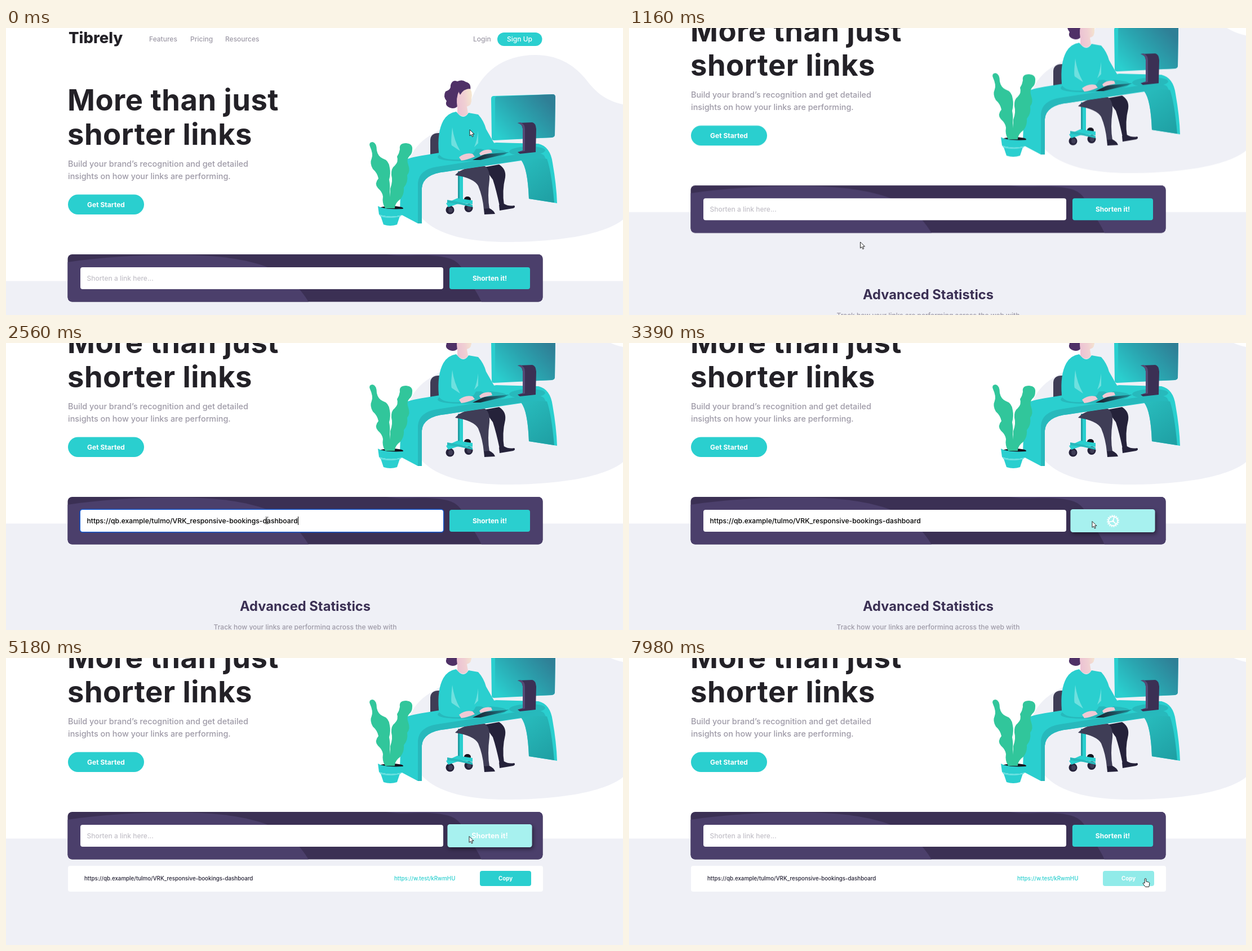
Recreate the animation shown at these times as an HTML page with a canvas. Size 1095x511 px, loop 8 s.

```html
<!DOCTYPE html>
<html lang="en">
<head>
<meta charset="utf-8">
<title>Link shortener</title>
<style>
  html, body { margin: 0; width: 100%; height: 100%; overflow: hidden; background: #fff; }
  body { position: relative; font: 500 12px Inter, "Open Sans", sans-serif; font-optical-sizing: none; color: #9e9aa7; }
  #page, #art { position: absolute; left: 0; top: 0; width: 1095px; height: 640px; }
  /* zero line height centres the capitals on the given y */
  p { position: absolute; margin: 0; line-height: 0; white-space: pre; }
  .mid { transform: translateX(-50%); }
  .logo { font-size: 27.5px; font-weight: 800; color: #232127; }
  .title { font-size: 52.5px; font-weight: 700; letter-spacing: .5px; color: #232127; }
  .lead { font-size: 14.4px; }
  .white { color: #fff; }
  .bold { font-weight: 700; color: #fff; }
  .section { font-size: 23.7px; font-weight: 700; color: #3b3054; }
  .box { position: absolute; border-radius: 4px; background: #fff; }
  #field { left: 132px; top: 426px; width: 644px; height: 39px; }
  #send { left: 787px; top: 426px; width: 143px; height: 39px; }
  #row { left: 109.5px; top: 499px; width: 843px; height: 45.5px; }
  #copy { left: 731.5px; top: 9px; width: 91px; height: 27px; }
  #hint { left: 11.5px; top: 19.5px; color: #c3c0c8; }
  #value { left: 11.5px; top: 19.5px; color: #000; font-size: 12.2px; }
  #caret { position: absolute; top: -7.5px; width: 1px; height: 15px; background: #000; }
  .small { font-size: 9.75px; }
  #gear { position: absolute; left: 59.5px; top: 7.5px; }
  #cursor { position: absolute; left: 0; top: 0; overflow: visible; }
</style>
</head>
<body>
<div id="page">
  <canvas id="art"></canvas>
  <div id="text"></div>
  <div id="more">
    <p class="section mid" style="left:531px;top:597.5px">Advanced Statistics</p>
    <p class="mid" style="left:531px;top:635px">Track how your links are performing across the web with</p>
  </div>
  <div id="field" class="box">
    <p id="hint">Shorten a link here...</p>
    <p id="value"><span id="typed"></span><i id="caret"></i></p>
  </div>
  <div id="send" class="box">
    <p id="sendText" class="bold mid" style="left:71.5px;top:19.5px">Shorten it!</p>
    <svg id="gear" width="24" height="24" viewBox="-12 -12 24 24" fill="none" stroke="#fff">
      <circle r="7.7" stroke-width="1.7"/>
      <circle r="9.4" stroke-width="2" pathLength="32" stroke-dasharray="1 1"/>
      <path id="spokes" stroke-width="1.7"/>
      <circle r="1.6" fill="#fff" stroke="none"/>
    </svg>
  </div>
  <div id="row" class="box">
    <p id="longUrl" class="small" style="left:29.5px;top:22.5px;color:#232033"></p>
    <p class="small" style="left:579.5px;top:22.5px;color:#2acfcf">https://w.test/kRwmHU</p>
    <div id="copy" class="box"><p class="bold small mid" style="left:45.5px;top:13.5px">Copy</p></div>
  </div>
</div>
<svg id="cursor" width="20" height="20"><path id="shape" stroke-linejoin="round"/></svg>

<script>
const LOOP = 8000;
const URL_TEXT = "https://qb.example/tulmo/VRK_responsive-bookings-dashboard";
const CYAN = [42, 207, 207], LIGHT = [167, 241, 239], GRAY = [158, 154, 167];
const $ = id => document.getElementById(id);

// ---- static text: x, centre y, words, classes
const labels = [
  [111, 17, "Tibrely", "logo"],
  [254, 20, "Features"], [327, 20, "Pricing"], [389, 20, "Resources"], [829, 20, "Login"],
  [911.5, 20, "Sign Up", "white mid"],
  [109, 127.5, "More than just", "title"],
  [109, 188.5, "shorter links", "title"],
  [110, 242, "Build your brand’s recognition and get detailed", "lead"],
  [110, 263.5, "insights on how your links are performing.", "lead"],
  [177.5, 314.5, "Get Started", "bold mid"]
];
for (const [x, y, words, cls = ""] of labels) {
  const p = document.createElement("p");
  p.className = cls;
  p.textContent = words;
  p.style.left = x + "px";
  p.style.top = y + "px";
  $("text").append(p);
}
$("longUrl").textContent = URL_TEXT;
$("spokes").setAttribute("d", [75, 195, 315].map(a => {
  const r = a * Math.PI / 180;
  return `M0 0L${7.5 * Math.cos(r)} ${7.5 * Math.sin(r)}`;
}).join(""));

// ---- static artwork
function drawArt() {
  const canvas = $("art"), dpr = window.devicePixelRatio || 1;
  canvas.width = 1095 * dpr;
  canvas.height = 640 * dpr;
  const c = canvas.getContext("2d");
  c.scale(dpr, dpr);

  const fill = (d, color) => { c.fillStyle = color; c.fill(new Path2D(d)); };
  const rect = (x, y, w, h, r, color) => {
    c.fillStyle = color; c.beginPath(); c.roundRect(x, y, w, h, r); c.fill();
  };
  const oval = (x, y, rx, ry, color, turn = 0) => {
    c.fillStyle = color; c.beginPath(); c.ellipse(x, y, rx, ry, turn, 0, 7); c.fill();
  };
  const fade = (x0, y0, x1, y1, ...colors) => {
    const g = c.createLinearGradient(x0, y0, x1, y1);
    colors.forEach((color, i) => g.addColorStop(i / (colors.length - 1), color));
    return g;
  };
  const cyan = "#2acfcf", shade = "#27b9bc", dark = "#3f3d56", night = "#25223a";
  const violet = "#3b3054", plum = "#4b3f6b", green = "#31c69b", skin = "#f0c9d4";

  rect(0, 0, 1095, 450.5, 0, "#fff");
  rect(0, 450.5, 1095, 190, 0, "#eff0f6");
  rect(872, 8, 79.5, 24, 12, cyan);
  rect(110, 296.5, 135, 35.5, 17.7, cyan);

  // backdrop
  fill("M1095 136C1060 128 1045 112 1028 90C1005 62 975 48 940 48C880 48 845 80 828 122C810 170 760 180 735 205C705 235 695 290 735 335C765 372 830 381 890 381C970 381 1060 370 1095 341Z", "#eff0f6");

  // chair
  fill("M753 227V199Q754 187 768 187L774 187V230Z", dark);
  oval(819, 305, 6, 5, "#16141f");
  rect(802, 255, 9, 50, 0, cyan);
  rect(802, 255, 3, 50, 0, "#1f9fa3");
  for (const [x, y] of [[788, 324], [821, 320.5]]) {
    oval(x, y, 7.5, 7.5, night);
    oval(x + 1, y, 4, 4.5, dark);
  }
  fill("M781 312L801 303L828 307V314L808 311L785 319Z", cyan);
  fill("M783 306L800 309L828 315V319L806 314L783 311Z", shade);

  // legs
  fill("M848 248L875 243Q888 251 886 266Q880 290 884 315L876 317Q870 288 864 270Z", night);
  fill("M875 315L884 313Q892 318 902 316Q905 319 900 321L876 325Z", night);
  fill("M797 262Q810 246 850 246Q859 252 858 270Q854 300 858 322L848 323Q846 300 838 281Q830 267 797 262Z", dark);
  fill("M848 322L858 321Q866 325 868 331L849 332Z", night);

  // monitor
  fill("M866 121L970 118Q975 118 975 123L974 190Q974 194 969 195L866 200Q862 200 862 196L861 126Q861 121 866 121Z", cyan);
  fill("M871 122L970 118Q975 118 975 123L974 190Q974 194 969 195L868 199V126Q868 122 871 122Z",
    fade(875, 195, 955, 122, cyan, "#2aa5b0", "#2f7f96"));

  // desk
  fill("M699 331Q700 250 713 233Q718 230 770 222L870 204L945 206Q966 211 970 240Q977 280 978 312L972 311L928 304Q926 250 915 236L780 256Q740 260 738 285V348H731Z", cyan);
  fill("M731 348V276Q733 252 765 247L900 226Q945 217 955 227L958 233L915 235L780 256Q740 260 738 285V348Z", shade);
  fill("M914 235Q935 231 960 233Q968 255 973 311L928 304Q926 250 914 235Z", fade(915, 235, 970, 310, "#28bcbd", "#1f9fa3"));
  oval(827, 226, 61, 10.5, shade, -.06);
  oval(925, 219, 32, 8, shade, -.04);

  // monitor stand
  fill("M908 169L934 168Q940 169 941 180L940 221L912 224L908 221L918 218L917 179Q916 171 908 169Z", violet);
  fill("M908 169L913 168Q921 171 921 180V219L908 221L917 218V179Q916 171 908 169Z", "#554a75");

  // laptop, person
  fill("M828 235L849 225L893 221L884 225L842 235Z", fade(828, 235, 890, 221, "#1b1d2b", "#1d4a58", "#1f8a94"));
  fill("M788 142Q778 138 782 130Q775 122 780 113Q790 110 789 102Q792 91 801 95Q810 91 816 96Q826 98 824 110L812 113Q806 118 805 134Q799 146 788 142Z", "#4f3167");
  fill("M801 142Q798 124 804 112Q810 105 821 106Q829 112 826 126Q827 138 818 140L820 152Q813 162 801 152Z",
    fade(800, 130, 827, 126, "#ecc3d3", "#f0cfd3", "#f5e6cf"));
  fill("M803 113Q806 103 824 104L824 108Q812 108 806 119Z", "#4f3167");
  fill("M768 222Q765 185 776 165Q784 151 799 149Q812 166 821 151L838 154Q848 165 852 180L868 208Q866 215 850 218L836 212L830 222Q818 227 806 234Q770 236 768 222Z", cyan);
  fill("M792 177Q789 205 791 209L806 219Q795 200 792 177Z", "#6fe0df");
  fill("M838 183Q836 200 831 212L838 205Z", "#6fe0df");
  fill("M804 230Q815 221 828 224L832 229Q818 235 808 236Z", skin);
  fill("M840 223Q848 215 861 217L863 222Q852 224 842 227Z", skin);

  // plant
  oval(684, 321, 21, 4, "#16141f");
  fill("M646 211Q643 203 651 203Q658 205 658 218Q660 228 668 232Q680 236 681 249Q683 259 680 270Q682 280 681 292L684 321H673Q667 312 669 300Q668 292 660 285Q653 277 661 268Q659 258 651 251Q645 241 649 232Q652 224 646 211Z", green);
  fill("M699 216Q697 205 710 205Q722 206 721 216Q721 224 716 228Q710 234 714 244Q718 255 712 262Q714 275 706 284Q707 300 696 308Q690 314 690 321H680Q682 300 682 286Q687 272 684 262Q683 250 690 245Q697 238 694 229Q698 223 699 216Z", green);
  fill("M660 317Q672 324 706 322L703 333Q682 339 662 332Z", cyan);
  fill("M665 335Q682 340 699 335L694 350Q682 354 670 350Z", cyan);
  fill("M662 332Q682 339 703 333L699 336Q682 340 665 336Z", "#62dfdf");

  // shortener panel
  c.save();
  c.beginPath();
  c.roundRect(109.5, 403, 843, 84.5, 8);
  c.clip();
  rect(109, 402, 845, 87, 0, violet);
  fill("M109 417C170 408 230 404 300 404C380 404 425 412 462 425C500 441 522 462 537 488H109Z", plum);
  fill("M670 402C700 409 730 402 765 406C790 409 800 414 808 426C820 450 832 462 844 488H954V402Z", plum);
  c.restore();
}

// ---- motion
// The picture is refreshed in bursts: first change, last change, steps.
const bursts = [
  [520, 1300, 12], [1370, 1760, 5], [2160, 2230, 2], [2560, 3250, 10],
  [3390, 4140, 12], [4220, 4990, 12], [5040, 5180, 3], [7780, 7980, 4]
];
function clock(ms) {
  let at = 0;
  for (const [from, to, n] of bursts) {
    if (ms < from) break;
    const gap = (to - from) / (n - 1);
    at = from + gap * Math.min(n - 1, Math.floor((ms - from) / gap + 1e-6));
  }
  return at;
}

const ramp = (t, a, b) => Math.min(1, Math.max(0, (t - a) / (b - a)));
const ease = (t, a, b) => (1 - Math.cos(Math.PI * ramp(t, a, b))) / 2;
const lerp = (a, b, k) => a + (b - a) * k;
const mix = (a, b, k) => a.map((v, i) => lerp(v, b[i], k));
const rgb = v => `rgb(${v.map(Math.round)})`;

// from, to, colour, lift
const sendMoves = [
  [2900, 3100, LIGHT, 1], [3390, 3590, GRAY, 0],
  [4980, 5170, LIGHT, 1], [7765, 8010, CYAN, 0]
];
// from, to, x, y
const cursorMoves = [
  [450, 1016, 412, 385.5], [1016, 1158, 410.5, 381], [1158, 1510, 463, 316],
  [2560, 3040, 822, 317.5], [7710, 7980, 916.5, 392.5]
];
const shapes = {
  arrow: "M0 0V11L2.6 8.7L4.4 12.7L6.2 11.9L4.5 8H8Z",
  hand: "M-1.3 8.5V1.5Q-1.3 0 0 0T1.3 1.5V5.5L6 6.7Q7.5 7.2 7.3 9L6.3 15H0L-4 9.7Q-4.8 8 -3.2 7.7Z",
  beam: "M-2.5 -6H-.5L0 -5.5L.5 -6H2.5M0 -5.5V5.5M-2.5 6H-.5L0 5.5L.5 6H2.5"
};

function drawCursor(t, scroll) {
  let x = 823, y = 181;
  for (const [a, b, nx, ny] of cursorMoves) {
    const k = ease(t, a, b);
    x = lerp(x, nx, k);
    y = lerp(y, ny, k);
  }
  const py = y + scroll;
  let kind = "arrow";
  if (t > 1300 && x > 132 && x < 776 && py > 426 && py < 465) kind = "beam";
  else if (t < 3390 && x > 787 && py > 426) kind = "hand";
  else if (x > 841 && py > 508) kind = "hand";
  const s = $("shape");
  s.setAttribute("d", shapes[kind]);
  s.setAttribute("fill", kind === "beam" ? "none" : "#fff");
  s.setAttribute("stroke", kind === "beam" ? "#333" : "#111");
  s.setAttribute("stroke-width", kind === "beam" ? 1 : .9);
  s.setAttribute("transform", `translate(${x} ${y})`);
}

function draw(t) {
  const scroll = 129 * ease(t, 971, 1189);
  $("page").style.transform = `translateY(${-scroll}px)`;

  const focus = t >= 1660 && t < 3240;
  const filled = t >= 2160 && t < 4985;
  $("field").style.boxShadow = focus ? "0 0 0 1.5px #1257d0" : "none";
  $("hint").hidden = filled;
  $("typed").textContent = filled ? URL_TEXT : "";
  $("caret").hidden = !focus;

  let color = CYAN, lift = 0;
  for (const [a, b, to, up] of sendMoves) {
    const k = ease(t, a, b);
    color = mix(color, to, k);
    lift = lerp(lift, up, k);
  }
  const busy = t >= 3385 && t < 4985;
  const send = $("send").style;
  send.background = rgb(color);
  send.transform = `scale(${1 + .05 * lift})`;
  send.boxShadow = `2px 3px 7px rgba(0,0,0,${.45 * lift})`;
  $("sendText").hidden = busy;
  $("gear").style.display = busy ? "" : "none";
  $("gear").style.transform = `rotate(${(t - 4220) * .18}deg)`;

  const done = t >= 4985;
  $("row").style.display = done ? "" : "none";
  $("more").style.transform = `translateY(${done ? 57 : 0}px)`;
  $("copy").style.background = rgb(mix(CYAN, LIGHT, ease(t, 7850, 8030)));

  drawCursor(t, scroll);
}

function tick() {
  draw(clock(performance.now() % LOOP));
  requestAnimationFrame(tick);
}
drawArt();
tick();
</script>
</body>
</html>
```
